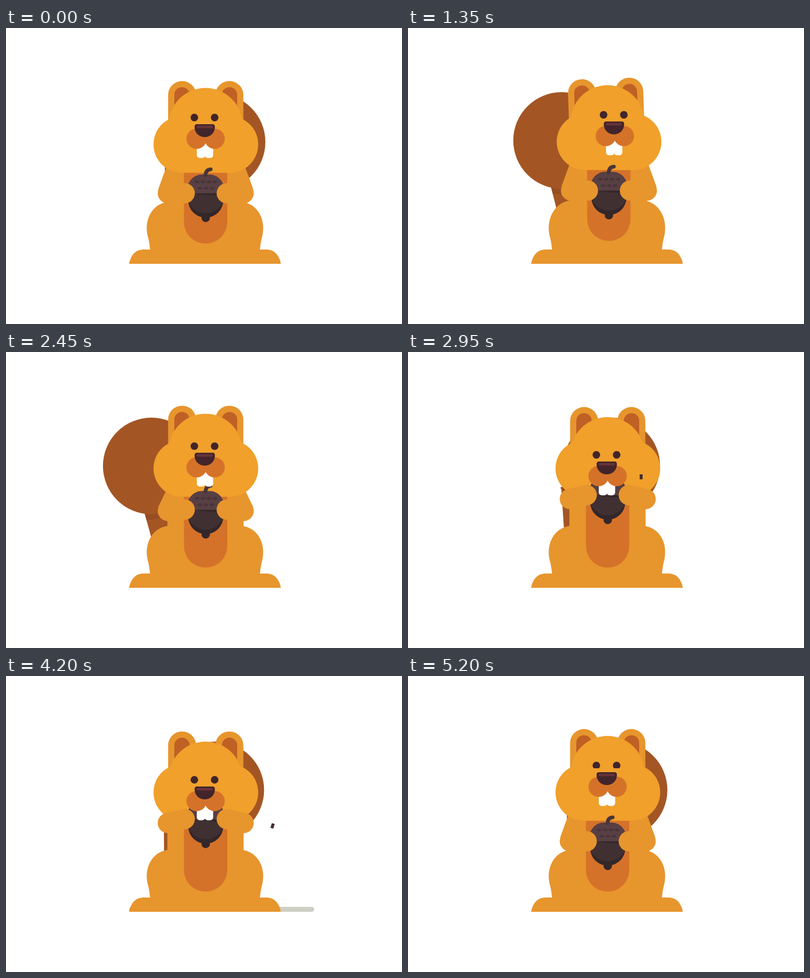
These frames come from a looping animation (800 px wide and 600 px high, 5.25 s). An HTML page with a canvas:

```html
<!DOCTYPE html>
<html lang="en">
<head>
<meta charset="utf-8">
<title>Squirrel with acorn</title>
<style>
html, body { margin: 0; width: 100%; height: 100%; overflow: hidden; background: #fff; }
canvas { display: block; }
</style>
</head>
<body>
<canvas id="stage" width="800" height="600"></canvas>
<script>
const ctx = document.getElementById('stage').getContext('2d');
const LOOP = 5250, MID = 403.5;
const FUR = '#e7952d', FACE = '#f0a02b', BELLY = '#d57229', EAR = '#bf6025',
      TAIL = '#a35624', TAIL_SHADE = '#964d21', DARK = '#42252a';

const clamp = v => Math.max(0, Math.min(1, v));
const ease = v => (1 - Math.cos(Math.PI * clamp(v))) / 2;
const pulse = (t, a, b, c, d) => ease((t - a) / (b - a)) - ease((t - c) / (d - c));

function fill(color, draw) {
  ctx.fillStyle = color;
  ctx.beginPath();
  draw();
  ctx.fill();
}
const circle = (x, y, r, color) => fill(color, () => ctx.arc(x, y, r, 0, 7));
const box = (x, y, w, h, r, color) => fill(color, () => ctx.roundRect(x, y, w, h, r));
const poly = (points, color) => fill(color, () => points.forEach(p => ctx.lineTo(...p)));

function at(x, y, draw, angle = 0) {
  ctx.save();
  ctx.translate(x, y);
  ctx.rotate(angle);
  draw();
  ctx.restore();
}

// Draws a left-hand part and its mirror image.
function both(draw, mid = MID) {
  draw();
  ctx.save();
  ctx.translate(2 * mid, 0);
  ctx.scale(-1, 1);
  draw();
  ctx.restore();
}

// 0 = tail at the left, 1 = tail at the right
function tailSwing(t) {
  for (const turn of [350, 1470, 2520, 3570, 4620]) {
    const d = t - turn, span = d < 0 ? Math.min(460, turn) : 545;
    if (Math.abs(d) < span) return ease(Math.abs(d) / span);
  }
  return 1;
}

function tail(s, look) {
  const x = 286 + 140 * s + 4 * look, y = 231 - 5 * look;
  const top = [278 + 26 * s + 17 * s ** 6 + 10 * look, 328 - 53 * s];
  ctx.save();
  poly([[top[0] - 2, top[1] - 6], top, [299 + 21 * s + 10 * look, 400], [380, 400], [380, 250]], TAIL);
  ctx.clip();
  circle(x - 8, y + 11, 98, TAIL_SHADE);
  ctx.restore();
  circle(x, y, 98, TAIL);
}

function legs(look) {
  const top = 352 - 5 * look;
  both(() => fill(FUR, () => {
    ctx.moveTo(404, 478);
    ctx.lineTo(249, 478);
    ctx.quadraticCurveTo(249, 472, 254, 463);
    ctx.quadraticCurveTo(262, 449, 278, 449);
    ctx.lineTo(291, 449);
    ctx.quadraticCurveTo(289, 430, 286, 421);
    ctx.bezierCurveTo(278, 383, 300, top, 334, top);
    ctx.lineTo(404, top);
  }), 402);
}

function acorn() {
  circle(403.5, 385, 8.5, '#33272a');
  ctx.save();
  fill('#33272a', () => {
    ctx.moveTo(439, 333);
    ctx.arc(403.5, 349, 35.5, 0, Math.PI);
    ctx.lineTo(368, 333);
  });
  ctx.clip();
  circle(403.5, 337.5, 38, '#413032');
  poly([[366, 334], [441, 334], [441, 341], [400, 338]], '#33272a');
  ctx.restore();
  fill('#573f43', () => {
    ctx.moveTo(366, 335);
    ctx.bezierCurveTo(364, 310, 380, 297, 396, 297);
    ctx.lineTo(411, 297);
    ctx.bezierCurveTo(427, 297, 443, 310, 441, 335);
  });
  for (let i = 0; i < 7; i++) {
    const x = i < 4 ? 386 + 12 * i : 392 + 12 * (i - 4);
    fill('#493539', () => ctx.ellipse(x, i < 4 ? 312 : 325, 4.5, 2.7, 0, 0, 7));
  }
  ctx.strokeStyle = '#483438';
  ctx.lineWidth = 7.5;
  ctx.lineCap = 'round';
  ctx.beginPath();
  ctx.moveTo(403, 298);
  ctx.quadraticCurveTo(404, 287, 413.5, 286.5);
  ctx.stroke();
}

function teeth() {
  box(385.5, 232, 17, 31.5, [0, 0, 6, 6], '#fff');
  box(401.5, 232, 17, 31.5, [0, 0, 6, 6], '#fff');
}

function face(lid) {
  circle(385, 224.5, 20.5, BELLY);
  circle(421.5, 224.5, 20.5, BELLY);
  fill(DARK, () => {
    ctx.moveTo(381, 200);
    ctx.quadraticCurveTo(381, 195, 386, 195);
    ctx.lineTo(417, 195);
    ctx.quadraticCurveTo(422, 195, 422, 200);
    ctx.bezierCurveTo(422, 228, 381, 228, 381, 200);
  });
  box(385, 198, 33, 5, 2.5, '#68323a');
  ctx.save();
  ctx.beginPath();
  ctx.rect(360, 160, 90, 21.5 + lid);
  ctx.clip();
  circle(380.5, 181.5, 7.7, DARK);
  circle(421.5, 181.5, 7.7, DARK);
  ctx.restore();
}

function crumb(t, start, speed) {
  const d = t - start;
  if (d < 60 || d > 490) return;
  at(MID + speed * d, 280 - 0.4395 * d + 0.00173 * d * d,
    () => box(-3, -5, 6, 10, 0, '#42302f'), Math.PI * (d - 150) / 137);
}

function draw(t) {
  const look = pulse(t, 50, 550, 1130, 1640);
  const eat = pulse(t, 2250, 2750, 4440, 5000);
  const chew = t > 2750 && t < 4350 ? 2 * Math.sin(Math.PI * (t - 2950) / 350) ** 2 : 0;
  const swing = tailSwing(t);
  const handY = 335 - 45 * eat, elbowY = 335 - 37 * eat;
  const lid = t < 4450 ? 8 : t < 4650 ? 8 - 5.5 * ease((t - 4450) / 200)
    : 2.5 + 3 * clamp((t - 4650) / 550) + 2.5 * clamp((t - 5200) / 50);

  ctx.fillStyle = '#fff';
  ctx.fillRect(0, 0, 800, 600);
  if (t > 3050 && t < 4400) box(180 + 70 * swing, 468, 374, 10, 5, '#cecfc4');
  tail(swing, look);
  legs(look);

  const dx = 4 * look, dy = -9 * look;
  at(dx, dy, () => {
    box(326, 240, 154, 170, 0, FUR);
    both(() => poly([[326, 276], [307.5, elbowY - 8], [327, elbowY], [350, 276]], FUR));
    box(359.5, 260, 87.5, 177, [0, 0, 43.7, 43.7], BELLY);
  });

  at(MID - 7 * look, 135 - 8.5 * look + 4 * eat + chew / 2, () => at(-MID, -135, () => both(() => {
    box(327.5, 107.5, 56.5, 95, [28, 28, 0, 0], FUR);
    box(340, 120, 31, 80, [15.5, 15.5, 0, 0], EAR);
  })), -0.053 * look);

  circle(403, 196 + dy + 10.5 * eat + chew / 2, 74.5, FACE);
  at(dx, dy, () => {
    box(298, 178.5, 211.5, 115, 57.5, FACE);
    at(0, -44.5 * eat, acorn);
    at(20 * look, 27 * eat + chew, teeth);
    both(() => {
      ctx.strokeStyle = FUR;
      ctx.lineWidth = 41;
      ctx.lineCap = 'round';
      ctx.beginPath();
      ctx.moveTo(327, elbowY);
      ctx.lineTo(361, handY);
      ctx.stroke();
    });
    at(20 * look, 27 * eat + chew, () => face(lid));
  });

  crumb(t, 2800, 0.45);
  crumb(t, 3397, -0.3);
  crumb(t, 3900, 0.45);
}

const begin = performance.now();
function frame() {
  // The picture advances in steps of 50 ms.
  draw(Math.floor((performance.now() - begin) % LOOP / 50) * 50);
  requestAnimationFrame(frame);
}
frame();
</script>
</body>
</html>
```
